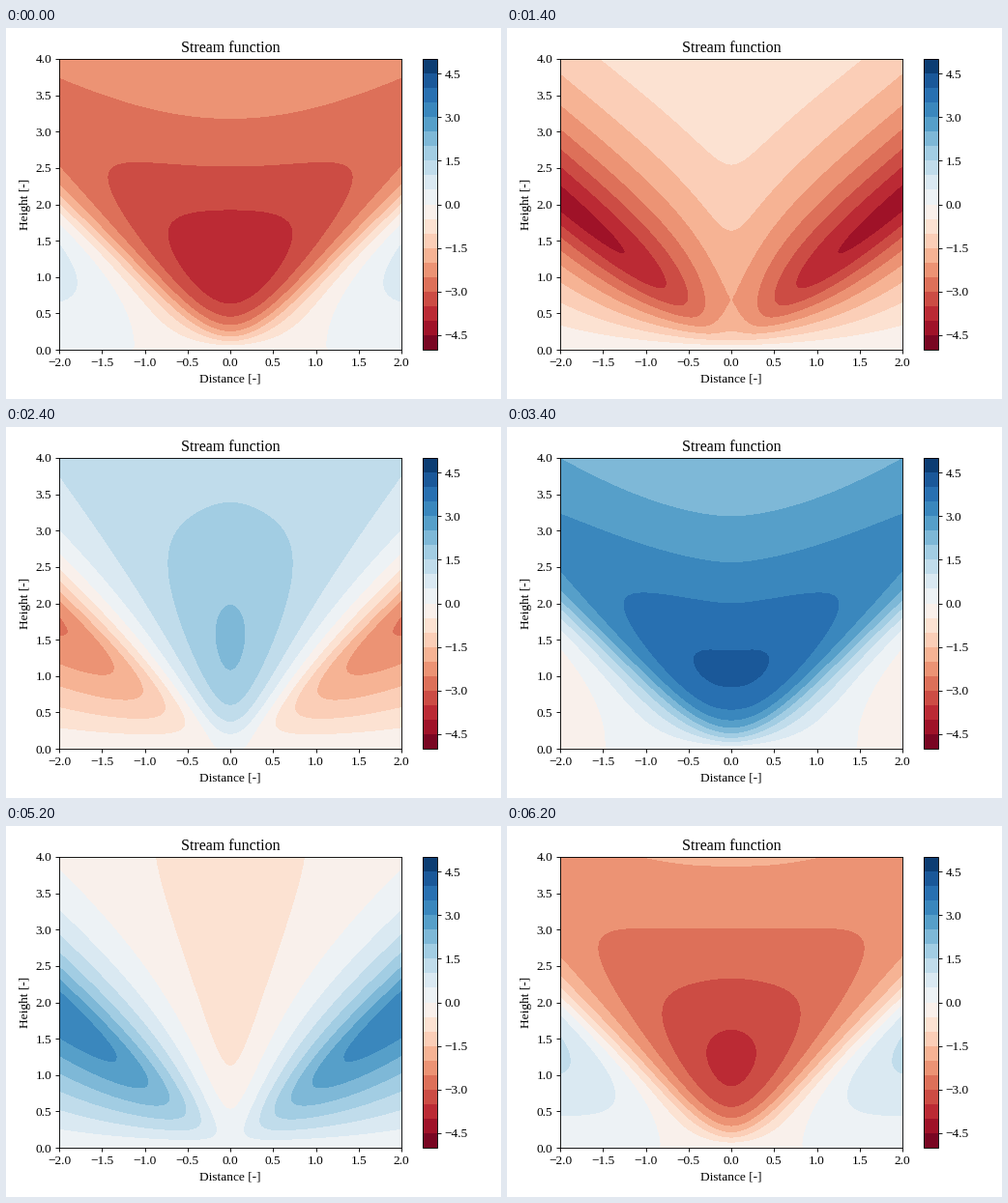
These frames come from a looping animation (512 px wide and 384 px high, 6400 ms). A matplotlib script:

```python
import numpy as np
import matplotlib.pyplot as plt
from matplotlib.animation import FuncAnimation

WIDTH, HEIGHT, DPI = 512, 384, 80
FRAMES, INTERVAL = 32, 200
COAST_WIDTH = 0.2   # smoothing length of the heating contrast
AMPLITUDE = 7.27

plt.rcParams.update({"font.family": "Liberation Serif", "font.size": 12})


def pixel_axes(fig, left, top, right, bottom):
    return fig.add_axes([left / WIDTH, 1 - bottom / HEIGHT,
                         (right - left) / WIDTH, (bottom - top) / HEIGHT])


def complex_response(x, z):
    """Integrate the linear sea-breeze modes over wavenumber k."""
    k = np.linspace(0, 80, 4001)
    weight = np.exp(-COAST_WIDTH * k) / (1 + k**2) * (k[1] - k[0])
    weight[[0, -1]] /= 2
    vertical = np.exp(1j * np.outer(z, k)) - np.exp(-z)[:, None]
    return (vertical * weight) @ np.cos(np.outer(k, x))


x = np.linspace(-2, 2, 81)
z = np.linspace(0, 4, 81)
response = complex_response(x, z)
levels = np.linspace(-5, 5, 21)

fig = plt.figure(figsize=(WIDTH / DPI, HEIGHT / DPI), dpi=DPI)
ax = pixel_axes(fig, 55, 32, 409, 333)
bar_ax = pixel_axes(fig, 431, 32, 446, 333)


def draw_contours(frame):
    phase = 2 * np.pi * frame / FRAMES
    psi = -AMPLITUDE * np.imag(response * np.exp(1j * phase))
    return ax.contourf(x, z, psi, levels=levels, cmap="RdBu")


contours = draw_contours(0)
fig.colorbar(contours, cax=bar_ax, ticks=np.arange(-4.5, 4.6, 1.5))
ax.set(title="Stream function", xlabel="Distance [-]", ylabel="Height [-]",
       xlim=(-2, 2), ylim=(0, 4))


def update(frame):
    global contours
    contours.remove()
    contours = draw_contours(frame)
    return [contours]


anim = FuncAnimation(fig, update, frames=FRAMES, interval=INTERVAL,
                     repeat=True, repeat_delay=0)
plt.show()
```
